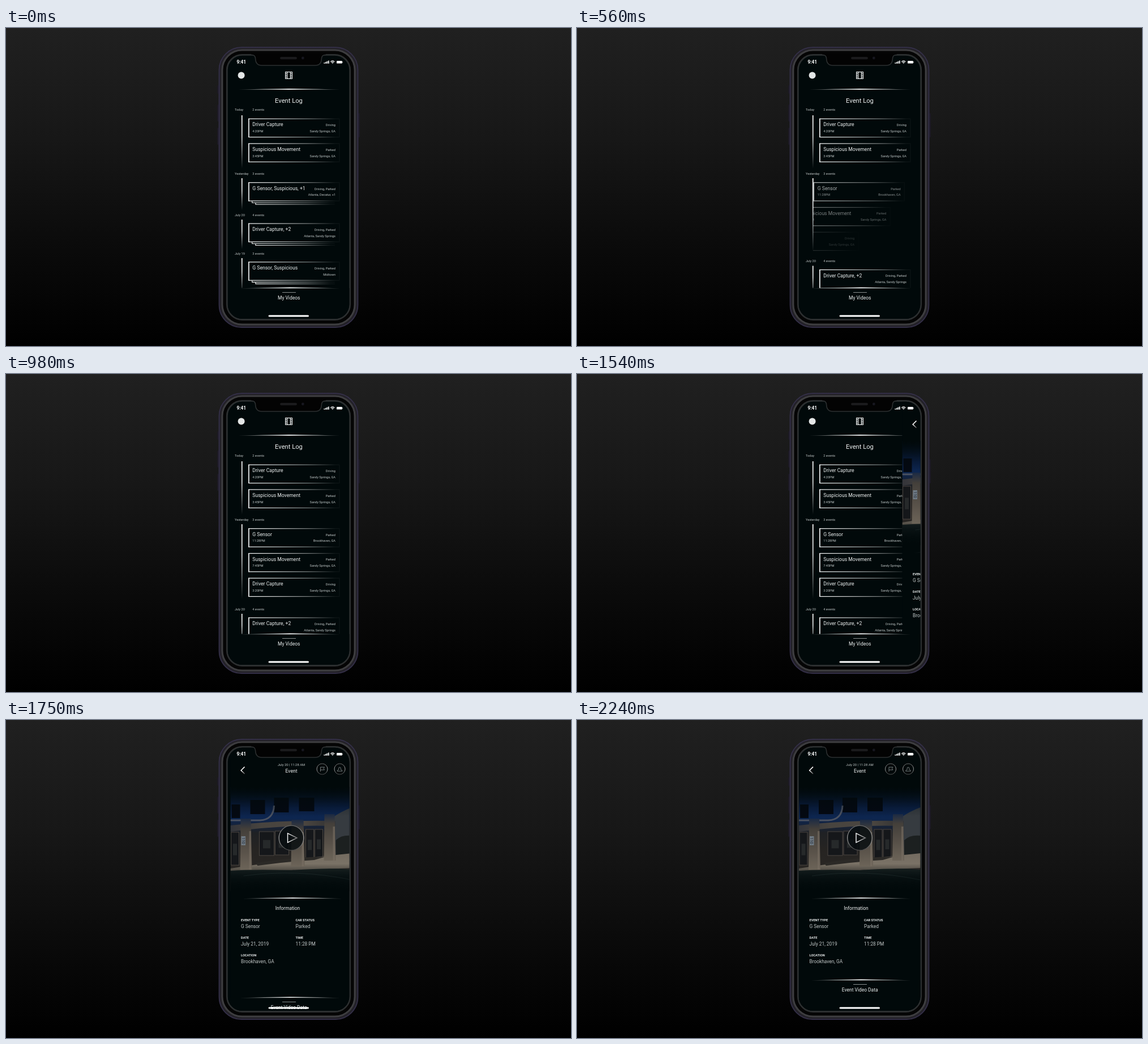
Write an HTML page that moves like this. It is 998 px wide and 561 px high and loops after 2310 ms.

```html
<!DOCTYPE html>
<html lang="en">
<head>
<meta charset="utf-8">
<title>Event log</title>
<style>
  html, body { margin: 0; width: 100%; height: 100%; overflow: hidden; background: #000; }
  svg { display: block; width: 998px; height: 561px; }
  text { font-family: Roboto, "Open Sans", sans-serif; fill: #eef0f0; }
  .title { font-size: 8.6px; }
  .small { font-size: 5.6px; fill: #c3c8c8; }
  .label { font-size: 5.7px; font-weight: 700; }
  .value { font-size: 8.35px; fill: #c4c8c8; }
  .mid { text-anchor: middle; }
  .end { text-anchor: end; }
</style>
</head>
<body>
<svg id="stage" viewBox="0 0 998 561" xmlns="http://www.w3.org/2000/svg"></svg>
<script>
const SCREEN = '#01090a', LOOP = 2310, STEP = 70;

const text = (x, y, s, cls, extra = '') => `<text x="${x}" y="${y}" class="${cls}" ${extra}>${s}</text>`;
const box = (x, y, w, h, fill, extra = '') =>
  `<rect x="${x}" y="${y}" width="${w}" height="${h}" fill="${fill}" ${extra}/>`;
const path = (d, extra) => `<path d="${d}" ${extra}/>`;
const line = (d, stroke, w, extra = '') => path(d, `fill="none" stroke="${stroke}" stroke-width="${w}" ${extra}`);
const group = (id, inner, extra = '') => `<g id="${id}" ${extra}>${inner}</g>`;

// stops: [offset, colour, opacity]
const gradient = (id, dir, stops) =>
  `<linearGradient id="${id}" x1="0" y1="0" x2="${dir === 'x' ? 1 : 0}" y2="${dir === 'x' ? 0 : 1}">` +
  stops.map(([o, c, a = 1]) => `<stop offset="${o}" stop-color="${c}" stop-opacity="${a}"/>`).join('') +
  '</linearGradient>';
const clip = (id, x, y, w, h, rx = 0) =>
  `<clipPath id="${id}">${box(x, y, w, h, '#fff', `rx="${rx}"`)}</clipPath>`;

const flare = (x0, x1, y) => {
  const m = (x0 + x1) / 2;
  return path(`M${x0} ${y}Q${m} ${y - 4} ${x1} ${y}Q${m} ${y - .6} ${x0} ${y}Z`, 'fill="url(#flare)"');
};

function card(y, title, sub, right1, right2, stack) {
  let s = box(428.8, y + .2, 160, 32.3, 'none', 'stroke="url(#edge)" stroke-width="1.2"') +
    line(`M428.8 ${y - .3}v33.3`, '#f4f6f6', 1.4) +
    text(435.3, y + 13.2, title, 'title') +
    text(582, y + 13.1, right1, 'small end') +
    text(582, y + 23.8, right2, 'small end');
  if (sub) s += text(435.3, y + 23.8, sub, 'small');
  if (stack) for (const i of [0, 1])
    s += line(`M${434.7 + 6.2 * i} ${y + 33 + 3 * i}v2.7h${146 - 6 * i}`, 'url(#edge)', 1.1);
  return s;
}
const day = (y, name, count) => text(404, y, name, 'small') + text(435.3, y, count + ' events', 'small');
const bar = (y, h, id = '') => box(415.9, y, 1.7, h, 'url(#bar)', id && `id="${id}"`);

const defs = `<defs>
  ${gradient('room', 'y', [[0, '#202020'], [.35, '#171717'], [.7, '#0a0a0a'], [1, '#000']])}
  ${gradient('edge', 'x', [[0, '#fff'], [.3, '#fff', .8], [.65, '#fff', .48], [.95, '#fff', .06], [1, '#fff', .04]])}
  ${gradient('flare', 'x', [[0, '#fff', .1], [.25, '#ddd', .55], [.5, '#fff'], [.75, '#ddd', .55], [1, '#fff', .1]])}
  ${gradient('bar', 'y', [[0, '#fff'], [.4, '#fff', .85], [.75, '#fff', .35], [1, '#fff', 0]])}
  ${gradient('ring', 'y', [[0, '#666'], [.5, '#a5a5a5'], [1, '#4a4a4a']])}
  ${gradient('play', 'x', [[0, '#fff'], [1, '#777']])}
  ${gradient('chev', 'y', [[0, '#fff'], [.5, '#fff'], [1, '#555']])}
  ${gradient('wall', 'y', [[0, '#04101f'], [.16, '#0a1d40'], [.3, '#0d2650'], [.37, '#15223a'], [.44, '#1f2124'], [.6, '#262422'], [1, '#2c2825']])}
  ${gradient('column', 'y', [[0, '#1b2a44'], [.2, '#433f3a'], [.6, '#575048'], [1, '#6c6458']])}
  ${gradient('lintel', 'x', [[0, '#34353a'], [.3, '#48443f'], [.7, '#4b4640'], [1, '#2f3032']])}
  ${gradient('ground', 'y', [[0, '#736b60'], [.6, '#7a7266'], [1, '#4d4942']])}
  ${gradient('hood', 'y', [[0, '#141d1d'], [.3, '#0c1516'], [1, SCREEN]])}
  ${gradient('fade', 'y', [[0, SCREEN], [.2, SCREEN, .2], [.28, SCREEN, 0], [.8, SCREEN, 0], [1, SCREEN]])}
  ${clip('screen', 391.7, 48.7, 214.8, 464.3, 25.5)}
  ${clip('listArea', 392, 66, 215, 392.5)}
  ${clip('slot', 417, 262, 190, 150)}
  ${clip('photo', 392, 118, 214.6, 184)}
</defs>`;

function phoneBody() {
  const side = (x, y, h) => box(x, y, 2.8, h, '#1d1a25', 'rx="1.2"');
  return side(373, 101, 15) + side(373, 135, 30) + side(373, 176, 30) + side(622.2, 150, 43) +
    box(376.5, 34.2, 245, 494, '#232128', 'rx="39.5" stroke="#35304a" stroke-width="1.7"') +
    box(381.9, 39, 234.2, 484, '#050505', 'rx="35" stroke="#3e3e40" stroke-width="3"') +
    box(390.3, 47.3, 217.4, 467.2, SCREEN, 'rx="27" stroke="#2c2f30" stroke-width="2.8"');
}

function notch() {
  const edge = 'M433 47.3Q440.2 47.3 440.6 54Q441 66 452 66H546Q557 66 557.4 54Q557.8 47.3 565 47.3';
  return path(edge + 'V45H433Z', 'fill="#030303"') + line(edge, '#2c2f30', 1.6) +
    box(484, 51, 30, 4.2, '#1b1b1d', 'rx="2.1"') + '<circle cx="524.3" cy="53" r="2.4" fill="#17171f"/>';
}

function statusBar() {
  let s = text(407.5, 63.3, '9:41', '', 'font-size="8.3" font-weight="700" style="fill:#fff"');
  for (let i = 0; i < 4; i++) s += box(561.5 + i * 2.5, 61 - i * 1.2, 1.7, 1.8 + i * 1.2, '#fff', 'rx=".4"');
  s += line('M573.2 59.6Q576.8 56 580.4 59.6M574.7 61.1Q576.8 59.1 578.9 61.1', '#fff', 1.1) +
    '<circle cx="576.8" cy="62.3" r=".8" fill="#fff"/>' +
    box(584, 58, 9.8, 4.6, '#fff', 'rx="1.2"') + box(594.3, 59.4, .8, 1.8, '#bbb');
  return s;
}

function filmIcon() {
  let s = box(493.6, 77.6, 11.8, 11.8, 'none', 'stroke="#fff" stroke-width="1.1"') +
    line('M496.6 77.5v12M502.4 77.5v12', '#fff', 1.1);
  for (let i = 1; i < 4; i++) s += line(`M493.6 ${77.6 + i * 2.95}h3m5.8 0h3`, '#fff', 1.1);
  return s;
}

const listPage = () =>
  '<circle cx="415.6" cy="83.5" r="6" fill="#e4e6e6"/>' + filmIcon() + flare(408, 592, 109) +
  text(499.5, 131.8, 'Event Log', 'mid', 'font-size="11.2"') +
  day(146.4, 'Today', 2) + bar(154, 94) +
  card(160, 'Driver Capture', '4:20PM', 'Driving', 'Sandy Springs, GA') +
  card(203.7, 'Suspicious Movement', '3:45PM', 'Parked', 'Sandy Springs, GA') +
  day(258.5, 'Yesterday', 3) +
  group('slotBox',
    group('pile', card(272.5, 'G Sensor, Suspicious, +1', '', 'Driving, Parked', 'Atlanta, Decatur, +1', true)) +
    group('in0', card(272.5, 'G Sensor', '11:28PM', 'Parked', 'Brookhaven, GA')) +
    group('in1', card(316.3, 'Suspicious Movement', '7:45PM', 'Parked', 'Sandy Springs, GA')) +
    group('in2', card(360, 'Driver Capture', '3:20PM', 'Driving', 'Sandy Springs, GA')),
    'clip-path="url(#slot)"') +
  bar(265, 56, 'growBar') +
  group('lower',
    day(331.5, 'July 20', 4) + bar(338, 52) +
    card(344.8, 'Driver Capture, +2', '', 'Driving, Parked', 'Atlanta, Sandy Springs', true) +
    day(399.6, 'July 19', 3) + bar(406, 60) +
    card(412.7, 'G Sensor, Suspicious', '', 'Driving, Parked', 'Midtown', true));

const column = (x, y, w, h) =>
  path(`M${x + 1} ${y}h${w - 2}l2 ${h}h${-w - 1}Z`, 'fill="url(#column)"') +
  box(x + w - 4, y + 22, 3.5, h - 22, '#7a7165', 'opacity=".6"');

const windowPane = (x, y, w, h) =>
  box(x, y, w, h, '#15171a', 'stroke="#4a4540" stroke-width="1"') +
  box(x + w * .25, y + h * .35, w * .5, h * .35, '#26292a');

function photo() {
  let s = box(392, 118, 214.6, 184, 'url(#wall)') +
    path('M572 172Q590 160 607 154V248H576Z', 'fill="#363b40"') +
    path('M578 212q10 -10 29 -8V244H578Z', 'fill="#1c2020"');
  for (const [x, y, w, h] of [[394, 149, 15, 24], [427, 141, 26, 25], [469, 137, 26, 26], [513, 137, 27, 24]])
    s += box(x, y, w, h, '#040912');
  s += path('M392 186Q480 176 577 178V187Q490 184 392 197Z', 'fill="url(#lintel)"') +
    line('M392 177H444Q468 176 469 151', '#4a5160', 3);
  for (const [x, y, w, h] of [[393, 198, 14, 58], [443, 197, 26, 42], [471, 196, 24, 42], [525, 193, 14, 52], [541, 193, 14, 50]])
    s += windowPane(x, y, w, h);
  s += path('M392 262Q480 248 607 235V261Q500 266 392 266Z', 'fill="url(#ground)"') +
    path('M436 252Q500 242 560 241L540 247Q490 250 440 257Z', 'fill="#2b2926"') +
    column(409, 174, 20, 90) + column(499, 176, 23, 82) + column(557, 166, 20, 82) +
    box(411, 205, 7.5, 16, '#6f7a84') +
    text(0, 0, '110', '', 'font-size="7" style="fill:#1b222a" transform="translate(412.3 207) rotate(90)"') +
    path('M392 266Q430 263 500 265Q570 260 607 264V302H392Z', 'fill="url(#hood)"') +
    line('M415 275Q510 262 606 282', '#1f2b2b', 1) +
    box(392, 118, 214.6, 184, 'url(#fade)');
  return group('view', s, 'clip-path="url(#photo)"');
}

const field = (x, y, name, value) => text(x, y, name, 'label') + text(x, y + 11.8, value, 'value');
const ring = (x, y, r, w, fill = 'none') =>
  `<circle cx="${x}" cy="${y}" r="${r}" fill="${fill}" stroke="url(#ring)" stroke-width="${w}"/>`;

const eventPage = () =>
  box(392, 48, 216, 468, SCREEN) +
  line('M417 82.6L410.6 88.9L417 95', 'url(#chev)', 1.5) +
  text(499.5, 81.3, 'July 20 | 11:28 AM', 'small mid', 'style="font-size:5.9px"') +
  text(499.5, 93, 'Event', 'title mid') +
  ring(554, 86.5, 9.5, 1) + ring(585, 86.5, 9.5, 1) +
  line('M551 91V83.2H558L556.4 85.6L558 88H551', '#8e9292', .8) +
  line('M583.2 87.5V85.2a1.8 1.8 0 0 1 3.6 0V87.5M580.6 90.2q0 -2.2 2.6 -2.7M589.4 90.2q0 -2.2 -2.6 -2.7M580.6 90.2h8.8', '#8e9292', .8) +
  photo() + ring(499.5, 208, 21.8, 1.2, 'rgba(5,12,14,.82)') +
  path('M493 199.8L509.5 208L493 216.2Z', 'fill="none" stroke="url(#play)" stroke-width="1.4"') +
  flare(411, 592, 315.2) +
  text(493, 335.4, 'Information', 'mid', 'font-size="8.4"') +
  field(410.5, 355.1, 'EVENT TYPE', 'G Sensor') + field(507, 355.1, 'CAR STATUS', 'Parked') +
  field(410.5, 386.2, 'DATE', 'July 21, 2019') + field(507, 386.2, 'TIME', '11:28 PM') +
  field(410.5, 417.4, 'LOCATION', 'Brookhaven, GA');

const drawer = () =>
  box(392, 459, 216, 60, SCREEN) + flare(411, 592, 459.5) +
  line('M488 466.5h24', '#8b8f8f', 1) +
  text(499.7, 479.4, '', 'mid', 'id="caption" font-size="8.45"');

const stage = document.getElementById('stage');
stage.innerHTML = defs + box(0, 0, 998, 561, 'url(#room)') + phoneBody() +
  group('content',
    group('list', listPage(), 'clip-path="url(#listArea)"') +
    group('event', eventPage()) + group('drawer', drawer()),
    'clip-path="url(#screen)"') +
  notch() + statusBar() + box(463.5, 506.4, 71.5, 3, '#fff', 'rx="1.5"');

const $ = id => document.getElementById(id);
const span = (t, from, len) => Math.min(1, Math.max(0, (t - from) / len));
const inOut = (u, p) => u < .5 ? 2 ** (p - 1) * u ** p : 1 - 2 ** (p - 1) * (1 - u) ** p;
const place = (id, x, y, alpha = 1) => {
  $(id).setAttribute('transform', `translate(${x.toFixed(2)} ${y.toFixed(2)})`);
  $(id).setAttribute('opacity', alpha.toFixed(3));
};

const CARD_W = 161, IN_START = [352, 428, 505];

function draw(t) {
  const out = span(t, 70, 440);
  place('pile', -CARD_W * out ** 5, 0, 1 - out ** 1.4);
  IN_START.forEach((start, i) => {
    const u = span(t, start, 420);
    place('in' + i, -CARD_W * (1 - u) ** 4, 0, 1 - (1 - u) ** 1.8);
  });

  const grow = inOut(span(t, 269.5, 371), 3);
  place('lower', 0, 85 * grow);
  $('growBar').setAttribute('height', 56 + 76 * grow);

  const open = t >= 1540;
  place('event', open ? 182.5 * Math.exp((1540 - t) / 56.7) : 0, 0, open ? 1 : 0);

  const swapped = t >= 1647;
  const drop = swapped ? 1 - inOut(span(t, 1647, 220), 2) : span(t, 1540, 107) ** 2;
  place('drawer', 0, 55 * drop);
  $('caption').textContent = swapped ? 'Event Video Data' : 'My Videos';
}

const begin = performance.now();
function tick() {
  const t = (performance.now() - begin) % LOOP;
  draw(Math.floor(t / STEP) * STEP);
  requestAnimationFrame(tick);
}
tick();
</script>
</body>
</html>
```
